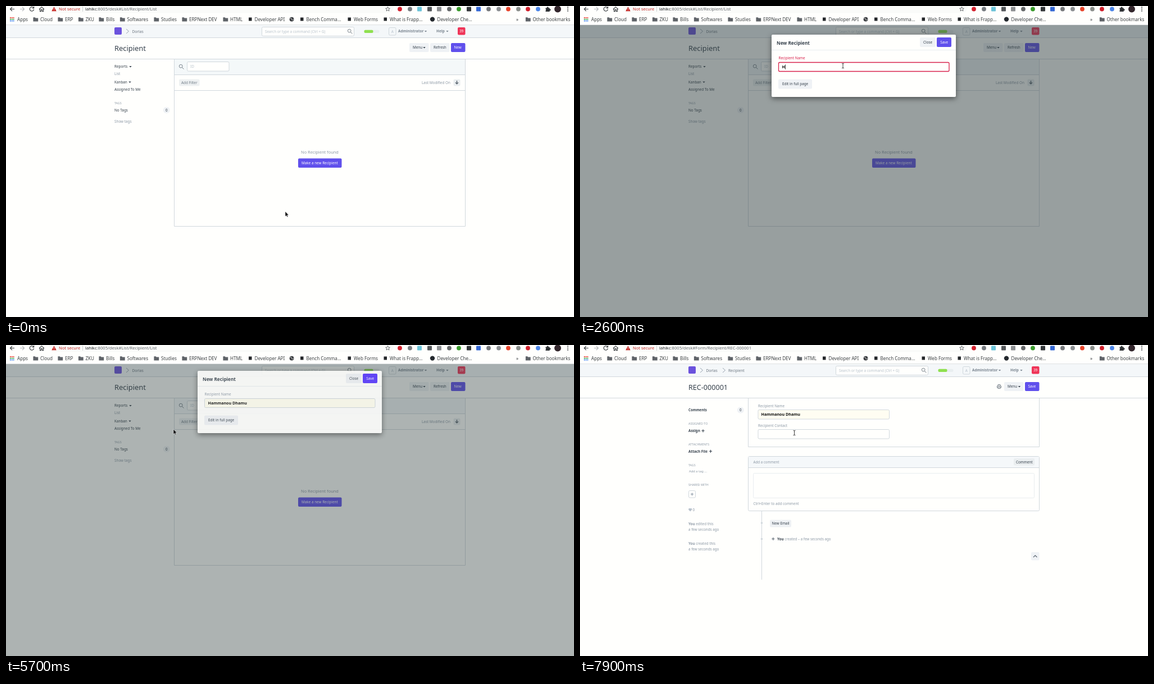
An HTML page for the animation above (8 s loop, 1011x554 px).

```html
<!DOCTYPE html>
<html lang="en">
<head>
<meta charset="utf-8">
<title>Recipient</title>
<style>
  html, body { margin: 0; width: 100%; height: 100%; overflow: hidden; background: #fffffd; }
  svg { display: block; width: 100vw; height: 100vh; }
  text { font-family: "Noto Sans", "Open Sans", sans-serif; white-space: pre; }
  #panel { filter: drop-shadow(0 3px 5px rgba(0, 0, 0, .5)); }
</style>
</head>
<body>
<svg id="stage" viewBox="0 0 1011 554" xmlns="http://www.w3.org/2000/svg"></svg>
<script>
const INK = '#36414c', MUTED = '#8d99a6', PALE = '#b8c2cc', LINE = '#d1d8dd',
      SOFT = '#eff2f5', BAR = '#f4f7f9', PAGE = '#fffffd', BLUE = '#6050ec', RED = '#d8224c';
const NAME = 'Hammanou Dhamu', LOOP = 8000;

// ---- shape helpers ----
const text = (x, y, s, fill = INK, size = 6.35, extra = '') =>
  `<text x="${x}" y="${y}" fill="${fill}" font-size="${size}" ${extra}>${s}</text>`;
const bold = (x, y, s, fill = INK, size = 6.35, extra = '') =>
  text(x, y, s, fill, size, 'font-weight="700" ' + extra);
const box = (x, y, x2, y2, fill, stroke = 'none', r = 0, extra = '') =>
  `<rect x="${x}" y="${y}" width="${x2 - x}" height="${y2 - y}" rx="${r}" fill="${fill}" stroke="${stroke}" ${extra}/>`;
const dot = (x, y, r, fill, stroke = 'none') =>
  `<circle cx="${x}" cy="${y}" r="${r}" fill="${fill}" stroke="${stroke}"/>`;
const path = (d, stroke, w = 1, fill = 'none') =>
  `<path d="${d}" fill="${fill}" stroke="${stroke}" stroke-width="${w}"/>`;
const hline = (x, x2, y, c = LINE) => path(`M${x} ${y}H${x2}`, c);
const group = (id, s) => `<g id="${id}">${s}</g>`;
const caret = (x, y, c = INK) => path(`M${x - 2.2} ${y - 1}h4.4l-2.2 2.4z`, 'none', 0, c);
const plus = (x, y, c = INK) => path(`M${x - 2.6} ${y}h5.2M${x} ${y - 2.6}v5.2`, c, 1.1);
const lens = (x, y, c = '#6c7680') =>
  path(`M${x + 1.4} ${y + 1.4}l3 3`, c, 1) + `<circle cx="${x - .8}" cy="${y - .8}" r="2.9" fill="none" stroke="${c}" stroke-width=".9"/>`;
const button = (x, y, x2, y2, tx, label, fill = SOFT, ink = INK, id = '') =>
  box(x, y, x2, y2, fill, 'none', 2, id && `id="${id}"`) + text(tx, (y + y2) / 2 + 2.3, label, ink);
const pill = y => box(280, y - 5.5, 291.5, y + 5.5, SOFT, 'none', 5) +
  text(285.7, y + 2.3, 0, INK, 6.2, 'text-anchor="middle"');
const chevron = x => path(`M${x} 41l4.5 4-4.5 4`, MUTED, .9);

// ---- browser bars ----
const folder = x => path(`M${x} 20.3h3.3l1 1.2h4.5v6h-8.8z`, 'none', 0, '#5f6368');
const bookmark = (x, s) => text(x, 26.5, s, '#3c4043', 8.08);
const folders = [[61, 'Cloud'], [105, 'ERP'], [141.5, 'ZKU'], [178, 'Bills'], [215.5, 'Softwares'],
  [276, 'Studies'], [326, 'ERPNext DEV'], [399, 'HTML'], [937.5, 'Other bookmarks']];
const links = [[442.5, 'Developer API'], [534.5, 'Bench Comma…'], [619, 'Web Forms'], [683, 'What is Frapp…']];
const round = [[701, '#d3222f'], [719, '#777b80'], [789, '#66686a'], [806, '#3a9a2c'], [859, '#77797c'],
  [877, '#8c8f92'], [894, '#e8452c'], [912, '#8b8e8b'], [929, '#d0202c'], [947, '#4d86e8']];
const square = [[736, '#6cc3d8'], [754, '#55585b'], [771, '#8d8f92'], [824, '#333639'], [841, '#3568d4']];
const appColors = ['#ea4335', '#34a853', '#4285f4'];
let apps = '';
for (let i = 0; i < 9; i++)
  apps += box(7 + i % 3 * 2.8, 20 + (i / 3 | 0) * 2.8, 8.9 + i % 3 * 2.8, 21.9 + (i / 3 | 0) * 2.8, appColors[(i / 3 | 0)]);

const browser = box(0, 0, 1011, 34, PAGE) + box(77, -9, 690, 12.5, '#fafbf9', 'none', 10) +
  path('M15 5.5H8M11 2L7.5 5.5 11 9', '#3c4043', 1.2) +
  path('M25 5.5h7M29 2l3.5 3.5L29 9', '#b4b7ba', 1.2) +
  path('M49 3.2A3.7 3.7 0 1 0 49.6 6.2M49.6 1v3h-3', '#3c4043', 1.2) +
  path('M59 6l4.5-4.3L68 6M60.5 5v4.6h2v-3h2v3h2V5', '#3c4043', 1.1) +
  path('M85.5 1.5l4.2 7.8h-8.4z', 'none', 0, '#c5221f') + path('M85.5 4.2v2.5M85.5 7.4v1', '#fff', .8) +
  text(94, 8.3, 'Not secure', '#c5221f', 7.5) + path('M136.5 1v9', '#c4c7ca', .8) +
  text(141, 8.3, '<tspan>lahikc</tspan><tspan id="url" fill="#5f6368"></tspan>', '#202124', 7.6) +
  path('M679.5 1.5l1.1 2.6 2.8.2-2.1 1.8.7 2.8-2.5-1.5-2.5 1.5.7-2.8-2.1-1.8 2.8-.2z', '#4a4d51', .8) +
  round.map(([x, c]) => dot(x, 5.5, 3.9, c)).join('') +
  square.map(([x, c]) => box(x - 4, 1.5, x + 4, 9.5, c, 'none', 1)).join('') +
  path('M960.5 3.5h2.3a1.4 1.4 0 1 1 2.6 0h2.3v2a1.4 1.4 0 1 1 0 2.6v1.8h-7.2v-2a1.4 1.4 0 0 0 0-2.4z', 'none', 0, '#2f3235') +
  dot(982, 5.5, 6, '#33262c') + [2.2, 5.5, 8.8].map(y => dot(1000, y, 1, '#3c4043')).join('') +
  apps + bookmark(20, 'Apps') +
  folders.map(([x, s]) => folder(x - 12.6) + bookmark(x, s)).join('') +
  links.map(([x, s]) => box(x - 10.5, 20.5, x - 5, 26.5, '#24272a') + bookmark(x, s)).join('') +
  dot(508.5, 23.6, 3.9, '#34373a') + path('M505.3 22.5q2-1.7 3.2 0t-1 2M509.5 26q.5-2 2.4-2.3', '#fff', .8) +
  dot(759, 23.6, 4.2, '#24292e') + bookmark(767.5, 'Developer Che…') + bookmark(908, '»') +
  hline(0, 1011, 33.5, '#dfe2e3');

// ---- shared desk header ----
const navbar = box(0, 34, 1011, 56.5, BAR) + hline(0, 1011, 56.5) +
  box(193, 38, 206, 51, '#6b52dd', 'none', 2) + chevron(214) + text(224.5, 47.5, 'Dorlas', '#6c7680', 6.6, 'font-weight="500"') +
  box(455.5, 37.5, 619.5, 53.5, PAGE, LINE, 2) +
  text(461, 47.5, 'Search or type a command (Ctrl + G)', PALE) + lens(612, 45) +
  box(637.5, 42.8, 664.5, 48, '#e9eef0', 'none', 2) + box(637.5, 42.8, 653.5, 48, '#8fe04f', 'none', 2) +
  box(681.5, 38.5, 694, 52, BAR, LINE, 2) + text(687.8, 47.5, 'A', PALE, 6.4, 'text-anchor="middle"') +
  bold(698, 47.2, 'Administrator', '#7b8691', 6.45) + caret(747, 45, '#7b8691') +
  bold(766, 47.2, 'Help', '#7b8691', 6.45) + caret(785.5, 45, '#7b8691') +
  box(804, 38, 817.5, 51.5, '#ef3558', 'none', 2) + text(810.8, 47.1, 39, '#fff', 6.3, 'text-anchor="middle"') +
  hline(0, 1011, 94.5);
const title = (s, size) => text(193, 80, s, INK, size, 'font-weight="500"');

// ---- list page ----
const listPage = title('Recipient', 12.9) +
  button(718, 66, 752.5, 82, 724, 'Menu') + caret(744.5, 74) +
  button(755, 66, 789.5, 82, 761, 'Refresh') + button(792, 66, 817.5, 82, 797.5, 'New', BLUE, '#fff') +
  text(193, 110.3, 'Reports') + caret(221.5, 108) + text(193, 123.4, 'List', MUTED) +
  text(193, 137.5, 'Kanban') + caret(220.5, 135.5) + text(193, 151, 'Assigned To Me') +
  group('tags', text(193, 175.2, 'TAGS', MUTED, 5.3) + text(193, 187.5, 'No Tags') + pill(185.5) +
    text(193, 208, 'Show tags', MUTED)) +
  box(300, 95, 817, 122, '#f4f8f9') + path('M299.5 95V392.5H817.5V95', LINE) +
  hline(300, 817, 122.5) + hline(300, 817, 150.5) +
  lens(312, 108) + box(322.5, 99.5, 397, 116, PAGE, LINE, 2) + text(328, 110.2, 'ID', PALE) +
  button(308, 130.5, 344.5, 142.5, 312, 'Add Filter', '#eef1f2', '#727e89') +
  text(740, 138.8, 'Last Modified On', MUTED) + box(796.5, 130.5, 808.5, 142.5, '#eaeef0', 'none', 2) +
  path('M802.5 133v5.5M800 136.2l2.5 2.5 2.5-2.5', '#5b6670', 1.4) +
  text(525, 263, 'No Recipient found', MUTED, 7.42) +
  button(520, 271.5, 597.5, 288, 526, 'Make a new Recipient', BLUE, '#fff', 'make');

// ---- form page ----
const stamp = (y, verb) => text(193, y, `<tspan font-weight="700">You</tspan> ${verb} this`, MUTED, 6.3) +
  text(193, y + 9.3, 'a few seconds ago', MUTED, 6.3);
const formPage = chevron(254) + text(264, 47.5, 'Recipient', '#6c7680', 6.6, 'font-weight="500"') +
  title('REC-000001', 12.6) +
  path('M744 73v-2.5h4V73M743.8 76h-1.3v-3h7v3h-1.3M744 75h4v2.5h-4z', '#5b6670', .8) +
  button(755, 66, 789.5, 82, 761, 'Menu') + caret(782, 74) + button(792, 66, 817.5, 82, 797.5, 'Save', BLUE, '#fff') +
  bold(193, 118, 'Comments', INK, 6.1) + pill(116) +
  text(193, 142.3, 'ASSIGNED TO', MUTED, 5.35) + bold(193, 155, 'Assign') + plus(219, 152.8) +
  text(193, 179, 'ATTACHMENTS', MUTED, 5.35) + bold(193, 191.5, 'Attach File') + plus(232.5, 189.3) +
  text(193, 215.7, 'TAGS', MUTED, 5.3) + text(194, 226.7, 'Add a tag ...', MUTED, 5.76) +
  text(193, 250.7, 'SHARED WITH', MUTED, 5.35) + box(193.5, 259.5, 205.5, 272, PAGE, LINE, 2) + plus(199.5, 265.8, MUTED) +
  path('M196.2 296.5l-2.7-2.8a1.6 1.6 0 0 1 2.7-2.2 1.6 1.6 0 0 1 2.7 2.2z', 'none', 0, PALE) + text(200.5, 295.6, 0, MUTED) +
  stamp(321.3, 'edited') + stamp(356.4, 'created') +
  path('M299.5 95V181.5H817.5V95', LINE) +
  text(317, 110.6, 'Recipient Name', MUTED) + box(317, 115.5, 550.5, 132, '#fffdf2', LINE, 2) +
  bold(322.5, 126.4, NAME, '#111', 7.1) +
  text(317, 145.8, 'Recipient Contact', MUTED) + box(317, 150.5, 550.5, 167, PAGE, LINE, 2) +
  box(299.5, 198.5, 817.5, 295.5, PAGE, LINE, 2) + box(300, 199, 817, 218, '#f5f8fa') + hline(300, 817, 218.5) +
  text(308.5, 210.7, 'Add a comment', MUTED, 6.2) + button(772, 202, 809, 214.5, 776, 'Comment', '#eaeef0') +
  box(308.5, 228.5, 808.5, 272.5, PAGE, '#e8edef', 2) + text(308.5, 284.8, 'Ctrl+Enter to add comment', MUTED) +
  path('M323.5 296V418', LINE) + dot(323.5, 317, 1.8, LINE) + dot(323.5, 345.5, 1.8, LINE) +
  button(338, 311.5, 376, 324.5, 341.5, 'New Email', '#eef1f4') + plus(343.8, 345.3, '#5b6670') +
  text(351, 347.7, `<tspan font-weight="700" fill="${INK}">You</tspan> created – a few seconds ago`, MUTED, 6.25) +
  box(803, 369, 817.5, 383.5, SOFT, 'none', 2) + path('M807 378l3.2-3.2 3.2 3.2', '#5b6670', 1.2);

// ---- dialog ----
const dialog = box(341, 51, 669, 162, PAGE, 'none', 2, 'id="panel"') + hline(341, 669, 78.5, '#e8edef') +
  bold(350, 68.5, 'New Recipient', INK, 8.2) +
  button(605, 56, 633, 73, 611, 'Close') + button(635, 56, 661, 73, 641.2, 'Save', BLUE, '#fff', 'save') +
  text(353.5, 95.3, 'Recipient Name', RED, 6.35, 'id="label"') +
  box(353.5, 100.5, 657, 116.5, PAGE, RED, 2, 'id="field"') +
  bold(359.5, 111, '', '#111', 7.1, 'id="typed"') + box(0, 104.3, .8, 112.8, '#111', 'none', 0, 'id="bar"') +
  button(353, 130.5, 413, 147.5, 360, 'Edit in full page');

const cursors =
  group('arrow', path('M0 0V9L2.1 7.2 3.5 10 4.9 9.4 3.6 6.6H6.2Z', '#fff', .5, '#111')) +
  group('beam', path('M-1.9-4.3Q0-4.3 0-3.3Q0-4.3 1.9-4.3M0-3.8V3.8M-1.9 4.3Q0 4.3 0 3.3Q0 4.3 1.9 4.3', '#2a2a2a', .9)) +
  group('hand', path('M-.8.6Q0-.6.8.6V4L4.4 4.8Q5.2 5.2 4.9 6.6L4 10H-.6L-3.2 6.6Q-3 5.2-.8 6.6Z', '#fff', .6, '#111'));

const $ = id => document.getElementById(id);
$('stage').innerHTML = box(0, 0, 1011, 554, PAGE) + navbar + group('list', listPage) + group('form', formPage) +
  box(0, 34, 1011, 554, '#334143', 'none', 0, 'id="shade"') + group('dialog', dialog) + browser + group('cursor', cursors);

// ---- motion: each row is [time, values...] ----
const pointer = [[200, 497, 366], [500, 512, 325], [700, 532, 286], [800, 539, 281], [1000, 539, 281],
  [1100, 520, 187], [1200, 520, 187], [1500, 492, 130], [1600, 492, 130], [1900, 468, 106.5], [4500, 468, 106.5],
  [4600, 471.5, 106.5], [5200, 642, 68], [5400, 648, 65], [5500, 430, 120], [5600, 430, 120], [5700, 298, 150],
  [6800, 298, 150], [7100, 324, 150], [7200, 324, 150], [7500, 367, 143], [7600, 367, 143], [7800, 378, 162], [7900, 381.5, 156.5]];
// dialog offset, dialog opacity, shade opacity
const fade = [[1000, -22, 0, 0], [1100, -14, .74, .34], [1200, -14, .74, .34], [1300, -1, 1, .5], [1400, 0, 1, .5],
  [5600, 0, 1, .5], [5700, -5, .87, .4], [5800, -17.5, .18, .065], [5900, -22, 0, 0]];
const shapes = [[0, 'arrow'], [700, 'hand'], [1100, 'arrow'], [1800, 'beam'], [4800, 'arrow'],
  [5200, 'hand'], [5500, 'arrow'], [7500, 'beam']];
const keys = [[0, 0], [2600, 1], [2700, 2], [2900, 3], [3100, 5], [3300, 6], [3400, 7], [3500, 8],
  [3600, 10], [3800, 11], [4000, 12], [4100, 13], [4200, 14]];

const held = (rows, t) => rows.filter(r => r[0] <= t).pop()[1];
function glide(rows, t) {
  const i = rows.findIndex(r => r[0] > t);
  if (i < 1) return (i ? rows[rows.length - 1] : rows[0]).slice(1);
  const a = rows[i - 1], b = rows[i], k = (t - a[0]) / (b[0] - a[0]);
  return a.slice(1).map((v, j) => v + (b[j + 1] - v) * k);
}
const set = (id, attrs) => { for (const k in attrs) $(id).setAttribute(k, attrs[k]); };
const show = (id, on) => set(id, { display: on ? 'inline' : 'none' });

function draw(t) {
  const saved = t >= 6600, focus = t >= 1300 && t < 5300, filled = t >= 5300;
  show('list', !saved);
  show('form', saved);
  show('tags', t < 5800);
  $('url').textContent = ':8005/desk#' + (saved ? 'Form/Recipient/REC-000001' : 'List/Recipient/List');
  set('make', { fill: t >= 700 && t < 1300 ? '#4114ee' : BLUE });
  set('save', { fill: t >= 5200 ? '#5636ff' : BLUE });

  const [dy, alpha, dim] = glide(fade, t);
  set('shade', { opacity: dim });
  show('dialog', alpha > 0);
  set('dialog', { opacity: alpha, transform: `translate(0 ${dy})` });
  set('label', { fill: filled ? MUTED : RED });
  set('field', { fill: focus ? PAGE : '#fffeef', stroke: filled ? LINE : RED, 'stroke-width': focus ? 1.3 : 1 });
  $('typed').textContent = NAME.slice(0, held(keys, t));
  show('bar', focus && t >= 1700);
  if (alpha) set('bar', { x: 359.7 + $('typed').getComputedTextLength() });

  const shape = held(shapes, t);
  for (const s of ['arrow', 'beam', 'hand']) show(s, s === shape);
  set('cursor', { transform: `translate(${glide(pointer, t)})` });
}

const start = performance.now();
function tick() {
  draw(Math.floor((performance.now() - start) % LOOP / 100) * 100);
  requestAnimationFrame(tick);
}
tick();
</script>
</body>
</html>
```
